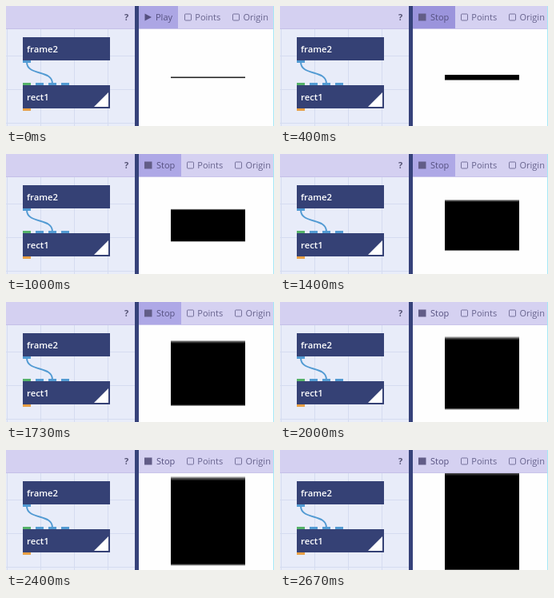
Write an HTML page that moves like this. It is 335 px wide and 150 px high and loops after 2.87 s.

```html
<!DOCTYPE html>
<html lang="en">
<head>
<meta charset="utf-8">
<title>Growing rectangle</title>
<style>
  html, body { margin: 0; width: 100%; height: 100%; overflow: hidden; background: #fff; }
  svg { display: block; width: 335px; height: 150px; }
  text { font: 500 11px "Open Sans", "Noto Sans", sans-serif; fill: #66628c; }
  .name { font-size: 11.3px; font-weight: 600; fill: #fff; }
  .help { font-weight: 700; fill: #565475; }
  .action { fill: #55507f; }
  .box { fill: none; stroke: #77739c; }

  .bar, .idle, .run, .options, .hover, .shape {
    animation: 2870ms step-end infinite;
  }
  .idle { animation-name: idle; }
  .run { animation-name: run; }
  .options { animation-name: shift; }
  .hover { animation-name: hover; }
  .shape { animation-name: grow; }

  @keyframes idle { 0% { opacity: 1 } 9.164%, 100% { opacity: 0 } }
  @keyframes run { 0% { opacity: 0 } 9.164%, 100% { opacity: 1 } }
  @keyframes shift {
    0% { transform: none }
    9.164%, 100% { transform: translateX(3px) }
  }
  @keyframes hover {
    0% { fill: #aca6e4; width: 49px }
    9.164% { fill: #9b94dc; width: 53px }
    20.78% { fill: #aea8e6; width: 53px }
    62.59%, 100% { fill: #d5d1f1; width: 53px }
  }
  /* One step every 66.7 ms, with a short stall late in the growth. */
  @keyframes grow {
    0% { transform: scaleY(1.4) }
    9.164% { transform: scaleY(1.4); animation-timing-function: steps(2, end) }
    13.81% { transform: scaleY(6.5); animation-timing-function: steps(9, end) }
    34.72% { transform: scaleY(40); animation-timing-function: steps(6, end) }
    48.65% { transform: scaleY(62.5); animation-timing-function: steps(5, end) }
    60.27% { transform: scaleY(80); animation-timing-function: steps(2, end) }
    64.91% { transform: scaleY(86); animation-timing-function: step-end }
    69.56% { transform: scaleY(89); animation-timing-function: steps(3, end) }
    76.53% { transform: scaleY(98.5); animation-timing-function: steps(7, end) }
    92.79%, 100% { transform: scaleY(122) }
  }
</style>
</head>
<body>
<svg viewBox="0 0 335 150">
  <!-- node editor -->
  <rect width="161" height="150" fill="#e8ecf9"/>
  <path d="M1.5 28V150M43.5 28V150M85.5 28V150M127.5 28V150M0 62.5H161M0 104.5H161M0 146.5H161" stroke="#d5dcf0" fill="none"/>
  <rect width="161" height="28" fill="#d4d0f1"/>
  <path d="M0 28.5H161" stroke="#c5c0e8"/>
  <text class="help" x="148" y="18">?</text>

  <g fill="#354175">
    <rect x="21" y="39" width="109" height="29"/>
    <rect x="21" y="99" width="109" height="29"/>
  </g>
  <path d="M110 126L128 108V126Z" fill="#fff"/>
  <g fill="#539bd3">
    <rect x="21" y="68" width="10" height="3"/>
    <rect x="37" y="96" width="10" height="3"/>
    <rect x="53" y="96" width="10" height="3"/>
    <rect x="69" y="96" width="10" height="3"/>
  </g>
  <rect x="21" y="96" width="10" height="3" fill="#55b36a"/>
  <rect x="21" y="128" width="10" height="3" fill="#e9a044"/>
  <path d="M26 70C26 88 58 79 58 97" fill="none" stroke="#539bd3" stroke-width="2"/>
  <text class="name" x="26" y="58">frame2</text>
  <text class="name" x="26" y="118">rect1</text>

  <!-- viewer -->
  <rect x="166" width="169" height="150" fill="#fefefe"/>
  <g transform="translate(206 89.25)">
    <rect class="shape" y="-.5" width="93" height="1"/>
  </g>
  <rect x="166" width="169" height="28" fill="#d5d1f1"/>
  <rect class="hover" x="166" width="49" height="28" fill="#aca6e4"/>
  <path d="M166 28.5H335" stroke="#c9c4ea"/>

  <g class="idle">
    <path d="M173.5 9.5L182 14L173.5 18.5Z" fill="#55507f"/>
    <text class="action" x="187" y="18">Play</text>
  </g>
  <g class="run">
    <rect x="173" y="9.5" width="9.5" height="9" fill="#625d87"/>
    <text class="action" x="188" y="18">Stop</text>
  </g>
  <g class="options">
    <rect class="box" x="223.5" y="10" width="8" height="8" rx="1"/>
    <text x="236.3" y="18">Points</text>
    <rect class="box" x="283.5" y="10" width="8" height="8" rx="1"/>
    <text x="296.5" y="18">Origin</text>
  </g>

  <rect x="161" width="5" height="150" fill="#36427a"/>
  <rect x="334" width="1" height="150" fill="#a5e8f6"/>
</svg>
</body>
</html>
```
